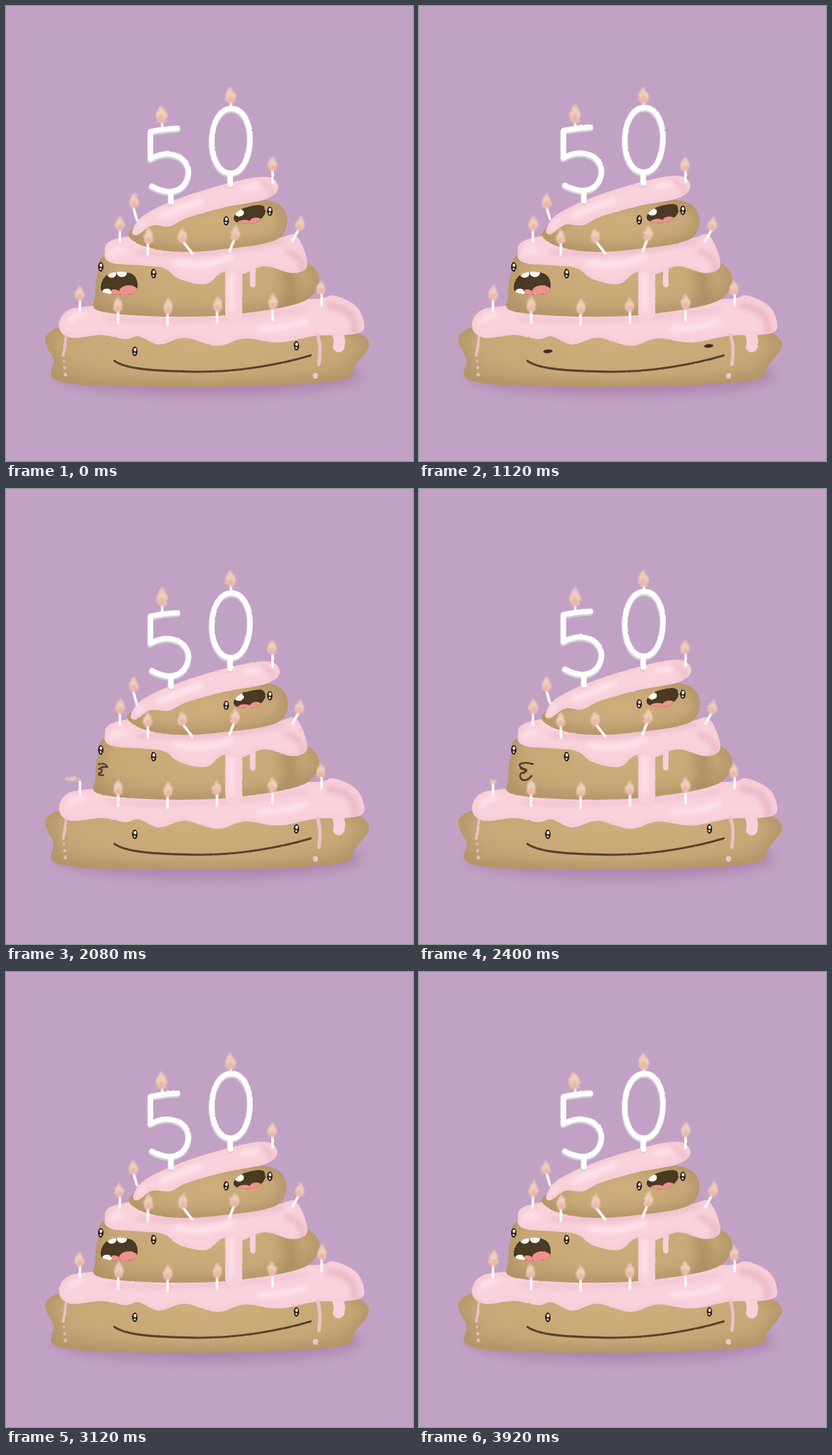
An HTML page for the animation above (4 s loop, 597 by 668 pixels).

```html
<!DOCTYPE html>
<html lang="en">
<head>
<meta charset="utf-8">
<title>Birthday cake</title>
<style>
  html, body { margin: 0; width: 100%; height: 100%; overflow: hidden; background: #c2a2c4; }
  svg { display: block; width: 597px; height: 668px; }
  .line { fill: none; stroke-linecap: round; stroke-linejoin: round; }
</style>
</head>
<body>
<svg id="stage" viewBox="0 0 597 668"></svg>
<script>
const $ = id => document.getElementById(id);
const area = 'filterUnits="userSpaceOnUse" x="0" y="0" width="597" height="668" color-interpolation-filters="sRGB"';
const blur = (id, size) => `<filter id="${id}" ${area}><feGaussianBlur stdDeviation="${size}"/></filter>`;
const rough = (id, scale, size) => `<filter id="${id}" ${area}>
  <feTurbulence type="fractalNoise" baseFrequency=".25" numOctaves="2" seed="4"/>
  <feDisplacementMap in="SourceGraphic" scale="${scale}" xChannelSelector="R" yChannelSelector="G"/>
  <feGaussianBlur stdDeviation="${size}"/></filter>`;
const defs = blur('soft', 9) + blur('glow', 3.5) + rough('brush', 2, .6) + rough('fuzz', 5, .9) + `
  <radialGradient id="sponge" cy=".45" r=".65">
    <stop offset="0" stop-color="#cfae7c"/><stop offset=".65" stop-color="#c8a777"/><stop offset="1" stop-color="#b99b6d"/>
  </radialGradient>
  <linearGradient id="fire" x2="0" y2="1">
    <stop offset="0" stop-color="#e4c4bb"/><stop offset=".5" stop-color="#f1d0b8"/><stop offset="1" stop-color="#e8b9b2"/>
  </linearGradient>`;

// Smooth closed outline through the points "x,y x,y ..."
function blob(text) {
  const points = text.trim().split(/\s+/).map(s => s.split(',').map(Number));
  const at = i => points[(i + points.length) % points.length];
  return 'M' + points[0] + points.map((a, i) => {
    const before = at(i - 1), b = at(i + 1), after = at(i + 2);
    const from = a.map((v, k) => v + (b[k] - before[k]) / 6);
    const to = b.map((v, k) => v - (after[k] - a[k]) / 6);
    return `C${from} ${to} ${b}`;
  }).join('') + 'Z';
}
const line = (d, color, width, more = '') =>
  `<path class="line" d="${d}" stroke="${color}" stroke-width="${width}" ${more}/>`;
const oval = (x, y, rx, ry, fill, more = '') =>
  `<ellipse cx="${x}" cy="${y}" rx="${rx}" ry="${ry}" fill="${fill}" ${more}/>`;
const group = (id, body, filter) => `<g id="${id}" ${filter ? `filter="url(#${filter})"` : ''}>${body}</g>`;

// Filled shape with a blurred rim and inner details
let clips = 0;
function solid(points, fill, rim, width, filter, inner = '') {
  const d = blob(points), id = 'clip' + clips++;
  return `<clipPath id="${id}"><path d="${d}"/></clipPath><path d="${d}" fill="${fill}"/>` +
    `<g clip-path="url(#${id})">${line(d, rim, width, `filter="url(#${filter})"`)}${inner}</g>`;
}
const sponge = (points, inner) => solid(points, 'url(#sponge)', '#a88c60', 9, 'soft', inner);
const icing = (points, inner) => solid(points, '#f9d2dc', '#f2c2cf', 3, 'glow', inner);
const mouth = (points, inner) => solid(points, '#4b3b25', '#3f311f', 2, 'glow', inner);
const drip = (d, width) => line(d, '#f8d0da', width);
const shine = (d, width) => line(d, '#fde4eb', width, 'filter="url(#glow)"');
const dusk = (d, width) => line(d, '#edbac8', width, 'filter="url(#glow)"');
const tongue = (x, y, rx, ry) => oval(x, y, rx, ry, '#ee928c');
const tooth = (x, y, rx, ry) => oval(x, y, rx, ry, '#fbf8f4');
const eye = (x, y) => oval(x, y, 4, 6.9, '#2d2118') +
  oval(x + .3, y - 2.5, 2, 2.6, '#f6f2ee') + oval(x - .2, y + 3.1, 1.5, 1.7, '#ded6ce');
const shutEye = (x, y) => oval(x, y, 6.8, 2.7, '#3c2d20', `transform="rotate(-4 ${x} ${y})"`);

const shadow = oval(296, 542, 226, 29, '#a67caa', 'filter="url(#soft)" opacity=".8"');

const bottomTier =
  sponge('77,472 70,520 88,553 290,559 480,551 511,530 517,480 300,440') +
  drip('M481 470Q492 488 488 500', 17) +
  icing(`78,472 88,449 128,440 300,425 448,430 480,425 515,442 525,474 500,483 455,484 400,494
    350,488 310,499 262,487 225,497 195,485 175,489 140,483 95,487`,
    dusk('M475 440Q514 445 512 478', 12) + dusk('M150 460Q300 468 440 444', 4) +
    shine('M93 463Q100 452 113 454', 7) + shine('M372 474Q410 474 440 463', 8)) +
  line('M88 486Q87 500 84 513', '#eebdc4', 4) + line('M457 483Q463 500 459 526', '#efc0c7', 5) +
  [0, 1, 2].map(i => oval(85 + i, 521 + i * 10, 1.7 + i * .4, 2 + i * .4, '#e6bdb8')).join('') +
  oval(454, 543, 3.8, 4.2, '#f0c2cb') +
  line('M159 521C175 533 215 536 285 537C340 537 400 527 447 513', '#55422d', 3.2) +
  group('openEyes', eye(189, 507) + eye(426, 499)) +
  group('shutEyes', shutEye(189, 507) + shutEye(425, 499));

const middleTier =
  sponge('150,362 135,390 131,425 138,448 240,456 350,451 446,428 438,375 250,335',
    line('M412 390Q425 420 412 445', '#a98c60', 18, 'filter="url(#soft)"')) +
  drip('M334 385V450', 25) + drip('M362 385V409', 8) +
  icing(`145,363 165,341 300,325 390,341 425,337 442,380 420,392 380,382 345,394 318,391 293,408
    255,401 232,385 200,381 155,377`,
    dusk('M195 362Q290 370 405 346', 6) + dusk('M413 360Q436 368 435 388', 9) +
    shine('M154 364Q160 354 172 360', 7) + shine('M250 376Q290 386 330 368', 9)) +
  shine('M331 395V445', 7) + eye(139, 383) + eye(216.5, 393) +
  group('sing', mouth('139,412 148,395 168,390 187,395 193,410 185,423 147,422',
    tongue(180, 419, 14, 9) + tongue(159, 422, 8, 6) + tooth(155, 393, 7, 6) + tooth(170, 392, 7.5, 6) + tooth(148, 420, 7, 5))) +
  group('blow', line('M136 404Q144 401 149 408Q139 408 136 411Q143 411 140 416Q134 417 137 420H143', '#4d3c28', 2.3)) +
  group('purse', line('M167 404Q155 400 148 404Q146 409 157 412Q160 415 150 417Q146 422 151 427Q160 429 165 421M149 410L157 413', '#4d3c28', 2.5));

const topBody = sponge('189,325 191,347 240,360 310,358 401,340 397,290 290,285');
const topIcing = icing(`187,328 204,305 260,279 340,255 385,250 398,266 380,282 325,293 290,302 262,311
    240,322 215,321 193,335`,
  dusk('M372 258Q390 262 388 274', 6) + shine('M195 325L202 316', 5) +
  shine('M228 307Q250 298 285 285', 9) + shine('M348 266L370 262', 7));
const topFace = mouth('334,309 345,297 374,291 380,303 365,317 341,317',
  tongue(350, 319, 12, 6.5) + tongue(367, 316, 10, 7) + tooth(342, 302, 7, 5.5)) + eye(323, 314) + eye(387, 300);

const digitPath = 'M251.500 178Q230 179 212 183L212 223Q232 211 252 219Q271 229 267 249Q261 271 238 271Q224 269 214 263M242 272V286' +
  'M331 149C348 149 359 171 358 196C357 222 346 244 330 244C312 244 302 222 302 197C302 171 313 149 331 149ZM329 245V260';
const digits = line('M229 167V178M330 139V148', '#f7f4f6', 4) +
  line(digitPath, '#d2cfd6', 9, 'transform="translate(-.5 2)"') + line(digitPath, '#fefdfe', 7.8);

// Foot of each candle and how far its flame leans sideways; the first two ride on the top tier
const candles = [
  [192, 313, -5], [391, 258, 0],
  [167, 346, 0], [208, 365, 0], [273, 363, -14], [328, 360, 7], [420, 345, 10],
  [108.5, 448, 0], [164.5, 465, 0], [237, 468, 0], [309.5, 465, 0], [391, 461, 0], [463, 439, 0]
];
const BLOWN = 7;
const stick = ([x, y, lean]) => line(`M${x} ${y}L${x + lean} ${y - 18}`, '#fbf8f7', 3.8);
const flames = [
  ...candles.map(([x, y, lean]) => ({ x: x + lean, y: y - 15, size: 24, tilt: Math.max(0, lean) })),
  { x: 228, y: 173, size: 29, tilt: 0 }, { x: 330, y: 144, size: 28, tilt: 0 }
];
const teardrop = '<path d="M0 0C-.34 0 -.58 -.22 -.5 -.46C-.43 -.7 -.2 -.75 0 -1C.2 -.75 .43 -.7 .5 -.46C.58 -.22 .34 0 0 0Z" fill="url(#fire)"/>';
const core = oval(0, -.28, .28, .18, '#e9a9a0', 'opacity=".5"');

$('stage').innerHTML = `<defs>${defs}</defs>` + shadow +
  group('cake', bottomTier + middleTier + group('body', topBody) + group('frosting', topIcing) +
    group('rider', topFace + candles.slice(0, 2).map(stick).join('') + digits) +
    candles.slice(2).map(stick).join(''), 'brush') +
  group('flames', flames.map(() => `<g>${teardrop}${core}</g>`).join(''), 'fuzz') +
  group('puff', oval(101.5, 393, 1.7, 1.7, '#d9b5c0') + oval(108, 406, 1.5, 2, '#cdaac4'));

const flameNodes = [...$('flames').children];
const show = (id, on) => $(id).setAttribute('visibility', on ? 'visible' : 'hidden');
const move = (node, value) => node.setAttribute('transform', value);
const between = (t, a, b) => t >= a && t < b;
const random = seed => { const v = Math.sin(seed * 12.9898) * 43758.5453; return v - Math.floor(v); };

function draw(t) {
  const step = Math.floor(t / 80), pose = step % 4;

  // The top tier bounces once every five steps and spreads as it sinks
  const drop = 4 * Math.sin(Math.PI * (step + 1) / 5) ** 2;
  const widen = k => `translate(293 0) scale(${1 + k * drop} 1) translate(-293 0)`;
  move($('body'), widen(.005));
  move($('frosting'), `translate(0 ${drop}) ${widen(.009)}`);
  move($('rider'), `translate(0 ${drop})`);

  const blink = between(t, 1040, 1200) || between(t, 2960, 3120);
  show('openEyes', !blink);
  show('shutEyes', blink);

  const blowing = between(t, 1840, 2400);
  const pursed = between(t, 1600, 1840) || between(t, 2400, 2880);
  show('sing', !blowing && !pursed);
  show('blow', blowing);
  show('purse', pursed);
  show('puff', between(t, 2480, 2800));

  flames.forEach(({ x, y, size, tilt }, i) => {
    const sway = random(i * 4 + pose + 1) * 2 - 1;
    let height = size + sway * 2.5, width = size * .53, angle = tilt + sway * 2;
    if (i === BLOWN && blowing) {
      y -= 7; width = 6; angle = -90;
    } else if (i === BLOWN && between(t, 2400, 2800)) {
      width = 10; height = 8 + (t - 2400) / 45;
    }
    move(flameNodes[i], `translate(${x + sway * .8} ${y}) rotate(${angle}) scale(${width} ${height})`);
  });
}

function tick(now) {
  draw(now % 4000);
  requestAnimationFrame(tick);
}
draw(0);
requestAnimationFrame(tick);
</script>
</body>
</html>
```
